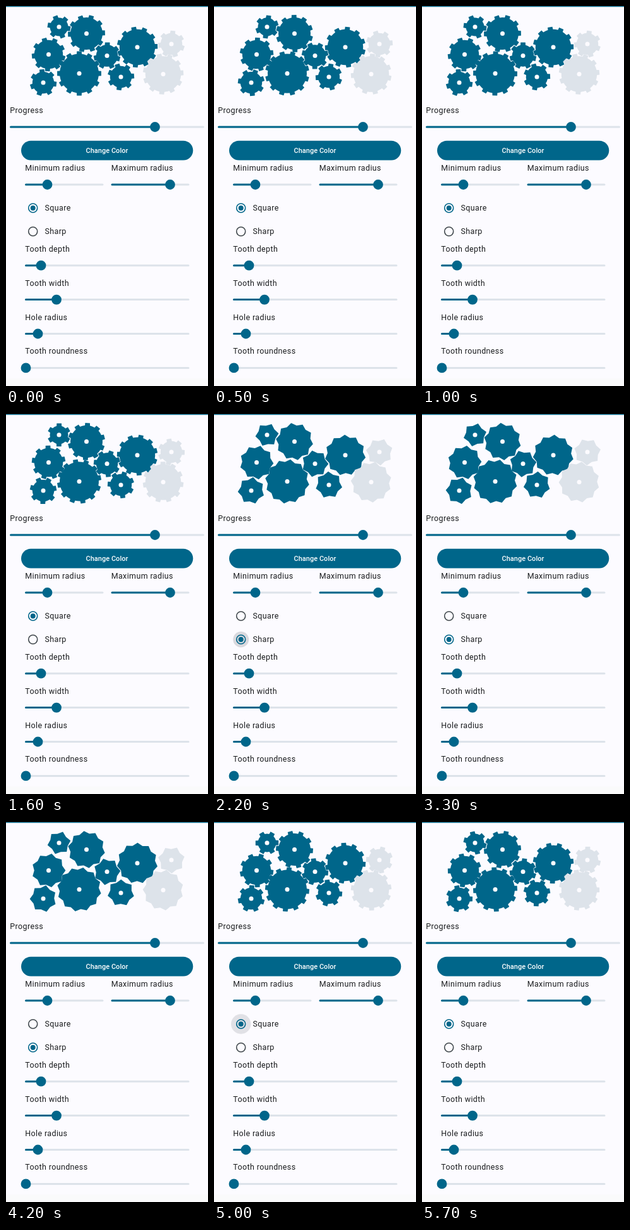
An HTML page that plays this animation: 320 px wide and 600 px high, repeating every 5.8 s.

```html
<!DOCTYPE html>
<html lang="en">
<head>
<meta charset="utf-8">
<title>Gears</title>
<style>
  html, body { margin: 0; width: 100%; height: 100%; overflow: hidden; background: #fcfbff; }
  svg { display: block; width: 320px; height: 600px; }
  text { font: 12.46px Roboto, sans-serif; letter-spacing: .39px; fill: #1a1c1e; }
  .button { font-size: 10.9px; font-weight: 500; letter-spacing: .08px; fill: #fff; text-anchor: middle; }
</style>
</head>
<body>
<svg id="stage" viewBox="0 0 320 600"></svg>
<script>
const LOOP = 5800, TAU = Math.PI * 2;
const TEAL = '#00668a', GREY = '#dde3ea', PAPER = '#fcfbff', INK = '#41484d';
const stage = document.getElementById('stage');

function add(tag, attrs, text) {
  const el = document.createElementNS('http://www.w3.org/2000/svg', tag);
  set(el, attrs);
  if (text) el.textContent = text;
  return stage.appendChild(el);
}
function set(el, attrs) {
  for (const key in attrs) el.setAttribute(key, attrs[key]);
}
const clamp = v => Math.max(0, Math.min(1, v));

function slider(x1, x2, y, value) {
  const line = (from, to, stroke) => add('line', {
    x1: from, x2: to, y1: y, y2: y, stroke, 'stroke-width': 3, 'stroke-linecap': 'round'
  });
  line(x1 + 1.5, x2 - 1.5, GREY);
  line(x1 + 1.5, value, TEAL);
  add('circle', { cx: value, cy: y, r: 7.9, fill: TEAL });
}

function radio(y) {
  const at = { cx: 42.7, cy: y };
  return {
    ripple: add('circle', { ...at, fill: INK }),
    ring: add('circle', { ...at, r: 7, fill: 'none', 'stroke-width': 1.6 }),
    dot: add('circle', { ...at, fill: TEAL })
  };
}

// Centre, tooth count, index of the gear that drives it
const gears = [
  [116, 106.5, 12], [160, 78.5, 7, 0], [67.5, 76.5, 9, 0],
  [127.5, 43.5, 10, 1], [208, 65, 11, 1], [182, 112, 7, 1],
  [59, 121, 7, 2], [84, 33, 6, 3], [249, 107.5, 11, 4], [262, 60, 7, 8]
].map(([x, y, n, driver], i) => {
  const gear = { x, y, n, driver, r: 2.75 * n + 2.1, path: add('path', { fill: i < 8 ? TEAL : GREY }) };
  add('circle', { cx: x, cy: y, r: 3.5, fill: PAPER });
  return gear;
});

function outline({ x, y, n, r, angle }, sharp) {
  const inner = r - 4.1, step = TAU / n;
  const at = (radius, a) =>
    (x + radius * Math.cos(a)).toFixed(2) + ' ' + (y + radius * Math.sin(a)).toFixed(2);
  let d = '';
  for (let k = 0; k < n; k++) {
    const a = angle + k * step, join = k ? 'L' : 'M';
    if (sharp) {
      d += join + at(r, a) + 'L' + at(inner, a + step / 2);
    } else {
      const base = Math.asin(4 / inner), tip = Math.asin(3.8 / r);
      d += join + at(inner, a - base) + 'L' + at(r, a - tip) + 'L' + at(r, a + tip) +
        'L' + at(inner, a + base) + `A${inner} ${inner} 0 0 1 ` + at(inner, a + step - base);
    }
  }
  return d + 'Z';
}

function turnGears(t, sharp) {
  for (const g of gears) {
    const p = gears[g.driver];
    if (p) {
      // A tooth of one wheel always faces a gap of the other
      const dir = Math.atan2(g.y - p.y, g.x - p.x);
      g.angle = dir + Math.PI - (Math.PI - p.n * (dir - p.angle)) / g.n;
    } else {
      g.angle = TAU / 4 + t / LOOP * TAU / 2;
    }
    set(g.path, { d: outline(g, sharp) });
  }
}

add('rect', { width: 320, height: 1.3, fill: TEAL });
add('rect', { y: 588, width: 320, height: 12, fill: '#fafafb' });
add('rect', { x: 24, y: 212.7, width: 272.3, height: 30.8, rx: 15.4, fill: TEAL });
add('text', { x: 160, y: 232.2, class: 'button' }, 'Change Color');
for (const [x, y, label] of [
  [6.3, 168.8, 'Progress'], [30.3, 259.7, 'Minimum radius'], [166.7, 259.7, 'Maximum radius'],
  [61.5, 323.2, 'Square'], [61.5, 360.2, 'Sharp'], [30.3, 387.8, 'Tooth depth'],
  [30.3, 441.7, 'Tooth width'], [30.3, 495.5, 'Hole radius'], [30.3, 549.3, 'Tooth roundness']
]) add('text', { x, y }, label);

slider(6, 314, 191, 236);
slider(30, 154.5, 282, 65.5);
slider(166.5, 290.5, 282, 260);
[55.5, 80, 50.5, 31.5].forEach((value, i) => slider(30, 290.5, 409.7 + i * 53.9, value));

const square = radio(319), sharpRadio = radio(356);

function drawRadio({ ripple, ring, dot }, on, sinceChange, sincePress) {
  const grow = clamp(sinceChange / 100);
  set(ring, { stroke: on ? TEAL : INK });
  set(dot, { r: 4 * (on ? grow : 1 - grow) });
  const fade = 1 - clamp((sincePress - 250) / 150);
  set(ripple, {
    r: 6 + 9.7 * clamp(sincePress / 225),
    opacity: sincePress < 0 ? 0 : fade * (.14 + .14 * (1 - clamp(sincePress / 225)))
  });
}

function frame(now) {
  const t = now % LOOP, toSharp = 2080, toSquare = 4880;
  const sharp = t >= toSharp && t < toSquare;
  const since = t < toSharp ? LOOP : t - (sharp ? toSharp : toSquare);
  turnGears(t, sharp);
  drawRadio(square, !sharp, since, t - toSquare + 110);
  drawRadio(sharpRadio, sharp, since, t - toSharp + 30);
  requestAnimationFrame(frame);
}
frame(performance.now());
</script>
</body>
</html>
```
